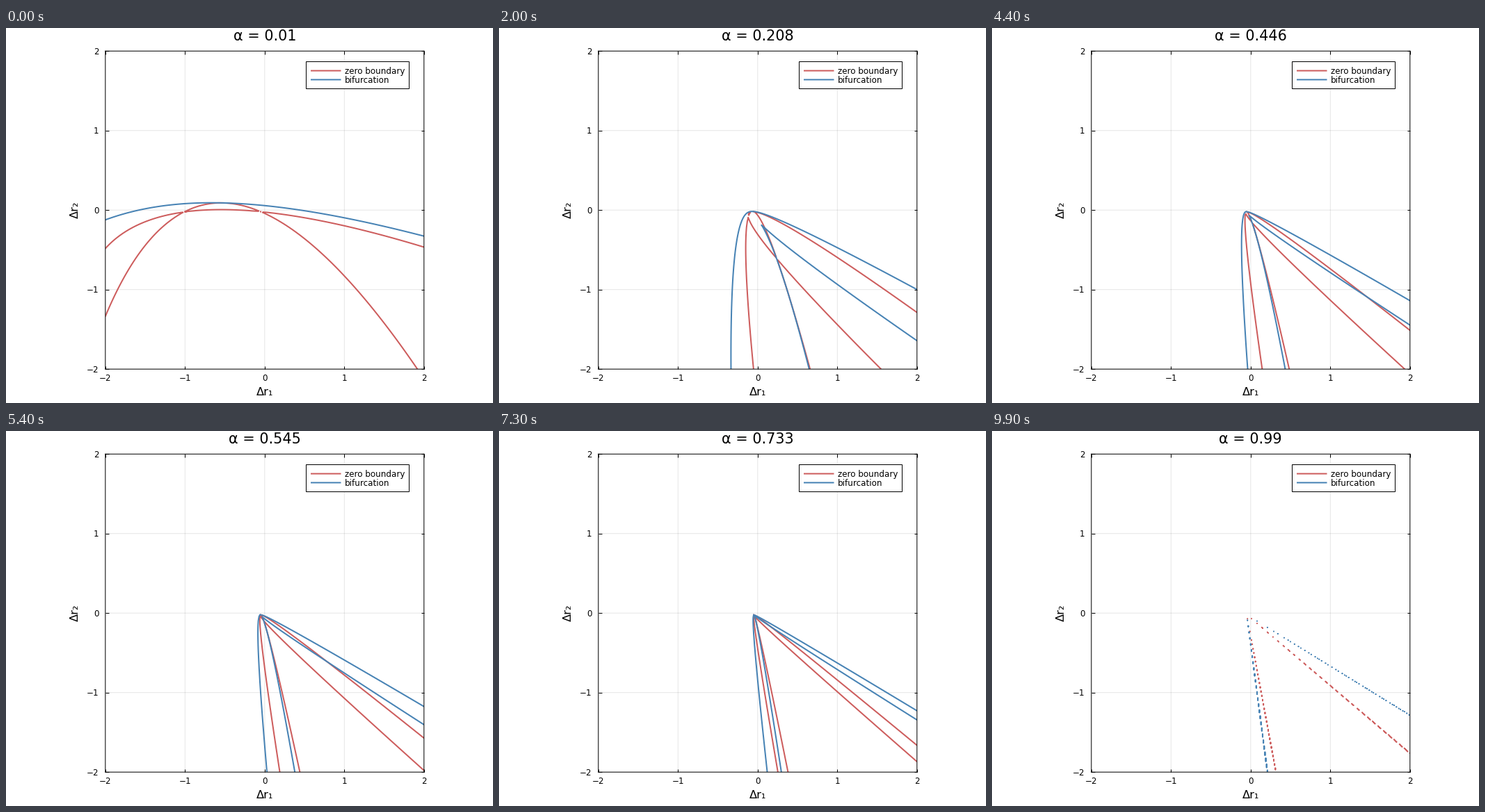
Recreate the animation shown at these times as a matplotlib script. Size 700 by 540 pixels, loop 10 s.

```python
import numpy as np
import matplotlib.pyplot as plt
from matplotlib.animation import FuncAnimation
from matplotlib.collections import LineCollection
from matplotlib.patches import Rectangle

W, H = 700, 540
FRAMES = 100
PX = 0.72  # points per pixel at 100 dpi
RED, BLUE = "#cd5c5c", "#4682b4"
LEFT, RIGHT, TOP, BOTTOM = 142.8, 600.8, 33.2, 491.2
UNIT = (RIGHT - LEFT) / 4
CX, CY = (LEFT + RIGHT) / 2, (TOP + BOTTOM) / 2

plt.rcParams.update({"font.family": "DejaVu Sans", "path.snap": False,
                     "path.simplify": False})
fig = plt.figure(figsize=(W / 100, H / 100), dpi=100, facecolor="white")
ax = fig.add_axes([LEFT / W, 1 - BOTTOM / H, (RIGHT - LEFT) / W, (BOTTOM - TOP) / H])
ax.set(xlim=(-2, 2), ylim=(-2, 2), xticks=range(-2, 3), yticks=range(-2, 3))
ax.set_axisbelow(True)
ax.grid(color="black", alpha=0.1, linewidth=PX)
ax.tick_params(direction="in", top=True, right=True, length=4.5 * PX, width=PX,
               labelbottom=False, labelleft=False)
for spine in ax.spines.values():
    spine.set_linewidth(PX)
    spine.set_zorder(5)


def label(x, y, text, size, ha="center", **kw):
    """Text with its baseline at pixel (x, y), measured from the top left."""
    return fig.text(x / W, 1 - y / H, text, fontsize=size * PX, ha=ha,
                    va="baseline", zorder=10, **kw)


for n in range(-2, 3):
    name = str(n).replace("-", "\u2212")
    label(CX + n * UNIT, 508, name, 11.9)
    label(133.5, CY - n * UNIT + 4.4, name, 11.9, ha="right")
label(CX, 529, "Δr₁", 16.3)
label(103.6, CY, "Δr₂", 16.3, rotation=90, rotation_mode="anchor")
title = label(CX, 18.4, "", 20.8)

# Legend, in pixel coordinates
key = fig.add_axes([0, 0, 1, 1], zorder=3)
key.set(xlim=(0, W), ylim=(H, 0))
key.axis("off")
key.add_patch(Rectangle((431.5, 48.5), 148, 39, facecolor="white",
                        edgecolor="black", linewidth=PX))
for y, color, name in ((61.5, RED, "zero boundary"), (74.4, BLUE, "bifurcation")):
    key.plot([438, 481.5], [y, y], color=color, linewidth=2 * PX, solid_capstyle="butt")
    label(487, y + 4.4, name, 11.9, ha="left")

# Equilibria of a quadratic two-species model: weight alpha on the quadratic part.
# Up to the scale (1 - alpha)^2 / alpha the curves always have the same shape.
grid = np.linspace(-2, 2, 401)
GX, GY = np.meshgrid(grid, grid)
X, Y = GX + 0.049, GY + 0.0202

# Parabolas y = e w + f w^2 and x = g v + h v^2, with w = x + k y, v = y + m x
k, e, f = 0.1853, -0.463, -47.45
m, g, h = 0.8503, 1.3295, 18.94
# Limit rays of the fold: y + m1 x = 0 and x + k2 y = 0
m1, k2 = 0.6172, 0.1311

# Along those rays the quadratic part of the model is -p^2 and +q^2
squares = np.array([[np.sqrt(-f * (1 - m1 * k)), np.sqrt(h * (m - m1))],
                    [np.sqrt(f * (k2 - k)), -np.sqrt(h * (1 - k2 * m))]])
linear = np.array([[e * (1 - m1 * k) + m1, 1 - m * g + m1 * g],
                   [1 - k * e + k2 * e, g + k2 * (1 - m * g)]])
(g11, g12), (c2, g22) = linear @ np.linalg.inv(squares)
c1 = -g12
d1 = -g11**2 / 4 - c1 * g22 / 2
d2 = g22**2 / 4 - c2 * g11 / 2


def zero_boundary(s):
    """Product of the two parabolas on which one species vanishes."""
    w = X + k * Y
    v = Y + m * X
    return (Y - e * w - f * w**2 / s) * (X - g * v - h * v**2 / s)


def bifurcation(s):
    """Discriminant of the quartic whose roots are the equilibria."""
    a = (Y + m1 * X) / s + d1
    b = (X + k2 * Y) / s + d2
    p, q, r = 2 * a, c1**2 * c2, a**2 - c1**2 * b
    return (16 * r * (4 * c1**2 * b)**2 - 4 * p * q**2 * (p**2 - 36 * r)
            - 27 * q**4)


def zero_lines(values):
    """Zero level as open polylines, so that tiny loops keep a full stroke."""
    cs = ax.contour(grid, grid, values / np.abs(values).max(), levels=[0])
    cs.remove()
    return [seg for seg in cs.allsegs[0] if len(seg) > 1]


curves = []
for func, color in ((zero_boundary, RED), (bifurcation, BLUE)):
    lines = LineCollection([], colors=color, linewidths=2 * PX, zorder=2.5,
                           capstyle="round", joinstyle="round")
    ax.add_collection(lines, autolim=False)
    curves.append((func, lines))


def update(i):
    alpha = 0.01 + 0.98 * i / (FRAMES - 1)
    s = (1 - alpha)**2 / alpha
    for func, lines in curves:
        lines.set_segments(zero_lines(func(s)))
    title.set_text(f"α = {round(alpha, 3)}")
    return []


anim = FuncAnimation(fig, update, frames=FRAMES, init_func=lambda: [],
                     interval=100, repeat=True, repeat_delay=0, blit=False)
plt.show()
```
